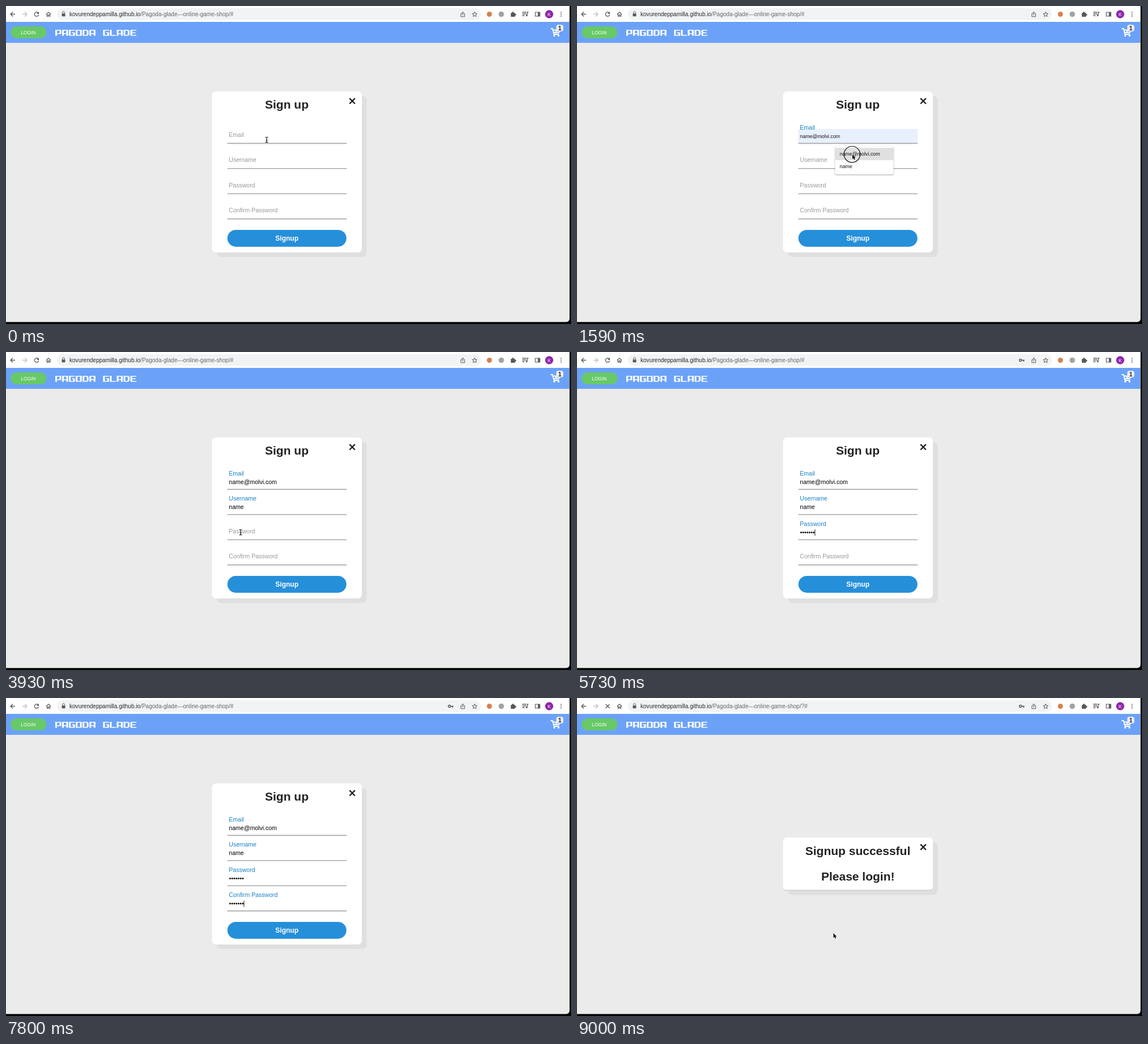
An HTML page with a canvas for the animation above (9.03 s loop, 997 by 561 pixels).

```html
<!DOCTYPE html>
<html lang="en">
<head>
<meta charset="utf-8">
<title>Sign up</title>
<style>
html, body { margin: 0; width: 100%; height: 100%; overflow: hidden; background: #000; }
canvas { display: block; }
</style>
</head>
<body>
<canvas id="stage" width="997" height="561"></canvas>
<script>
const ctx = document.getElementById('stage').getContext('2d');
const LOOP = 9030;
const SANS = '"Liberation Sans", Arial, sans-serif';
const ROW = 44.4;
const EMAIL = 'name@molvi.com';

const fields = [
  { label: 'Email', focus: 690 },
  { label: 'Username', focus: 2340 },
  { label: 'Password', focus: 4020, keys: [4560, 4920, 4980, 5070, 5400, 5460, 5520] },
  { label: 'Confirm Password', focus: 6300, keys: [6720, 6810, 7110, 7200, 7320, 7500, 7620] }
];
const SUBMIT = 8760;

// Pointer path: time, x, y
const pointerPath = [
  [0, 460, 236], [900, 460, 236], [1440, 486, 262], [1740, 486, 262],
  [2160, 446, 275], [2640, 446, 275], [3090, 476, 372], [3420, 476, 372],
  [3720, 414, 318], [5760, 414, 318], [6180, 440, 363], [8040, 440, 363],
  [8310, 450, 454], [8580, 452.5, 415], [LOOP, 452.5, 415]
];
const hiddenSpans = [[2520, 2880], [4560, 5760], [6720, 8040]];
const beamSpans = [[0, 1140], [1980, 2520], [3630, 4560], [5760, 6720], [8040, 8100]];
const clickSpans = [[660, 810], [1530, 1710], [2310, 2460], [3120, 3240],
  [3990, 4140], [6270, 6420], [8610, 8760]];

const within = (spans, t) => spans.some(([a, b]) => t >= a && t < b);
const clamp = v => Math.max(0, Math.min(1, v));
const ease = v => v * v * (3 - 2 * v);
const mix = (a, b, k) => a + (b - a) * k;

function box(x, y, w, h, r, color) {
  ctx.fillStyle = color;
  ctx.beginPath();
  ctx.roundRect(x, y, w, h, r);
  ctx.fill();
}

function disc(x, y, r, color) {
  ctx.fillStyle = color;
  ctx.beginPath();
  ctx.arc(x, y, r, 0, Math.PI * 2);
  ctx.fill();
}

function text(str, x, y, size, color, align = 'left', weight = 400) {
  ctx.font = `${weight} ${size}px ${SANS}`;
  ctx.fillStyle = color;
  ctx.textAlign = align;
  ctx.fillText(str, x, y);
}

function line(d, color, width, x = 0, y = 0, sx = 1, sy = 1) {
  ctx.save();
  ctx.translate(x, y);
  ctx.scale(sx, sy);
  ctx.strokeStyle = color;
  ctx.lineWidth = width;
  ctx.stroke(new Path2D(d));
  ctx.restore();
}

function shape(d, color, x, y) {
  ctx.save();
  ctx.translate(x, y);
  ctx.fillStyle = color;
  ctx.fill(new Path2D(d));
  ctx.restore();
}

function drawToolbar(t) {
  const ink = '#55585c';
  ctx.fillStyle = '#fff';
  ctx.fillRect(0, 0, 994, 28);
  box(90, 4, 748, 20.5, 10, '#f1f3f4');
  line('M4 0H-4M0-4L-4 0L0 4', ink, 1.3, 12, 14.5);
  line('M-4 0H4M0-4L4 0L0 4', '#bfc1c4', 1.3, 33, 14.5);
  if (t >= 8970) {
    line('M-3.5-3.5L3.5 3.5M3.5-3.5L-3.5 3.5', ink, 1.3, 54, 14.5);
  } else {
    line('M2.7-2.6A3.7 3.7 0 1 0 3.6 1', ink, 1.3, 54, 14.5);
    shape('M4-4.5V-.5H0Z', ink, 54, 14.5);
  }
  line('M-4 0L0-3.7L4 0M-2.7-.8V3.6H-.9V1H.9V3.6H2.7V-.8', ink, 1.1, 75, 14.5);

  box(98.5, 13.3, 6, 5, 0.8, ink);
  line('M-1.8 0V-2A1.8 1.8 0 0 1 1.8-2V0', ink, 1, 101.5, 13.5);
  const host = 'kovurendeppamilla.github.io';
  text(host, 112, 17.8, 10.05, '#26282b');
  const hostEnd = 112 + ctx.measureText(host).width;
  text(`/Pagoda-glade---online-game-shop/${t >= 8970 ? '?' : ''}#`, hostEnd, 17.8, 10.05, '#66696d');

  if (t >= 4560) {
    ctx.strokeStyle = ink;
    ctx.lineWidth = 1.5;
    ctx.beginPath();
    ctx.arc(782.5, 14.5, 2, 0, Math.PI * 2);
    ctx.stroke();
    line('M0 0H5M3.8 0V2.5', ink, 1.6, 784.5, 14.5);
  }
  line('M-1.5-1H-3.3V4.3H3.3V-1H1.5M0 2V-4M-2-2.2L0-4.2L2-2.2', ink, 1, 806, 14.5);
  line('M0-4.3L1.2-1.4L4.3-1.2L1.9.8L2.7 3.9L0 2.2L-2.7 3.9L-1.9.8L-4.3-1.2L-1.2-1.4Z', ink, 1, 827, 14.7);
  disc(853, 14.5, 4.5, '#d5814f');
  disc(874, 14.5, 4.8, '#a0a2a4');
  box(890.8, 12, 7.5, 7, 0.8, ink);
  disc(894.5, 11.4, 1.5, ink);
  disc(898.8, 15.3, 1.5, ink);
  line('M-5-3H2M-5 0H2M-5 3H-1M3.7 2.5V-3H6', ink, 1.3, 916, 14);
  disc(918.7, 16.7, 1.5, ink);
  line('M-4-3.5H4V3.5H-4Z', ink, 1.2, 938, 14.5);
  box(938.5, 11, 3.5, 7, 0, ink);
  disc(958.5, 14.5, 7.2, '#8e24aa');
  text('K', 958.5, 17.6, 8.5, '#fff', 'center');
  for (const dy of [-3.2, 0, 3.2]) disc(979.5, 14.5 + dy, 0.95, ink);
}

const letters = {
  P: 'M.5 7V.5H3V4.5H.5',
  A: 'M.5 7V.5H3V7M.5 4.5H3',
  G: 'M3.5 .5H.5V6.5H3V3.5H1.75',
  O: 'M.5 .5H3V6.5H.5Z',
  D: 'M.5 0V6.5H2.4L3 5.5V1.5L2.4 .5H.5',
  L: 'M.5 0V6.5H3.5',
  E: 'M3.5 .5H.5V6.5H3.5M.5 3.5H3'
};

function drawHeader() {
  ctx.fillStyle = '#6ba2f8';
  ctx.fillRect(0, 28, 994, 37);
  box(8, 36, 63.5, 21, 10.5, '#67c967');
  text('LOGIN', 39.3, 49.5, 8.4, '#fff', 'center');
  [...'PAGODA GLADE'].forEach((c, i) => {
    if (letters[c]) line(letters[c], '#fff', 1, 87 + i * 12.05, 42, 3, 1.5);
  });
  line('M-9-6H-5.5L-3 4H6M-4-3.5H7L5.5 1H-3.5', '#fff', 1.8, 970, 46);
  line('M1-3V0M-1-1.5H3', '#fff', 1.2, 970, 46);
  disc(967.5, 52.3, 1.6, '#fff');
  disc(975, 52.3, 1.6, '#fff');
  box(971, 33, 12.5, 12, 4, '#ebebeb');
  text('1', 977.2, 42.5, 10, '#222', 'center', 700);
}

function drawCard(y, h) {
  box(372, y + 8, 264.5, h, 8, '#dfdfdf');
  box(363.5, y, 264.5, h, 7, '#fff');
  line('M-4.8-4.8L4.8 4.8M4.8-4.8L-4.8 4.8', '#222', 2.4, 611, y + 17);
}

function drawField(field, i, t) {
  const dy = i * ROW;
  const k = ease(clamp((t - field.focus) / 210));
  const preview = i === 0 && t >= 1320 && t < 1710;
  if (preview) box(390.5, 217, 210.5, 25, 0, '#e8f0fe');
  const color = `rgb(${mix(153, 24, k)},${mix(153, 128, k)},${mix(153, 196, k)})`;
  text(field.label, 393.3, mix(230.8, 217.8, k) + dy, 10.55, color);
  box(390.5, 241.6 + dy, 210.5, 1.6, 0, '#a9a9a9');

  if (preview) text(EMAIL, 393.3, 233.2, 8.85, '#111');
  else if (i === 0 && t >= 1710) text(EMAIL, 393.3, 233, 10.55, '#000');
  if (i === 1 && t >= 3180) text('name', 393.3, 233 + dy, 10.55, '#000');

  if (field.keys) {
    const count = field.keys.filter(at => t >= at).length;
    for (let n = 0; n < count; n++) disc(395.4 + n * 3.75, 229.6 + dy, 1.45, '#000');
    const focused = t >= field.focus + 60 && (i === 3 || t < fields[3].focus);
    const typing = count > 0 || (t - field.focus) % 1060 < 530;
    if (focused && typing) box(393.4 + count * 3.73, 224.3 + dy, 0.9, 11, 0, '#000');
  }
}

function drawSuggestions(top, items, hovered) {
  const h = items.length * 22.2 + 5;
  ctx.save();
  ctx.shadowColor = 'rgba(0,0,0,.35)';
  ctx.shadowBlur = 2.5;
  ctx.shadowOffsetY = 0.8;
  box(455.5, top, 103, h, 1.5, '#fff');
  ctx.restore();
  shape('M-6 0L0-5L6 0Z', '#fff', 468.5, top + 0.5);
  line('M-6 0L0-5L6 0', '#dedede', 0.7, 468.5, top);
  items.forEach((item, i) => {
    const y = top + 2.5 + i * 22.2;
    if (i === hovered) box(455.5, y, 103, 21.8, 0, '#e0e0e0');
    text(item, 463.5, y + 14, 8.9, '#111');
  });
}

function drawSignup(t) {
  drawCard(150.7, 284);
  text('Sign up', 495.5, 181.3, 21, '#222', 'center', 700);
  fields.forEach((field, i) => drawField(field, i, t));
  box(390.7, 395, 210, 29.7, 14.85, '#268fda');
  text('Signup', 495.7, 414, 12, '#fff', 'center', 700);
  if (t >= 780 && t < 1710) {
    drawSuggestions(247.7, [EMAIL, 'name'], t >= 1320 ? 0 : -1);
  }
  if (t >= 2430 && t < 3180) {
    drawSuggestions(292, ['kovuren', 'Kovuren', 'k', 'name', 's', 'f'], t >= 3060 ? 3 : -1);
  }
}

function drawSuccess() {
  drawCard(246, 93.5);
  box(366, 338.6, 260, 1, 0, '#bcbcbc');
  text('Signup successful', 495.5, 276.7, 21, '#222', 'center', 700);
  text('Please login!', 495.7, 322, 21, '#222', 'center', 700);
}

function pointerAt(t) {
  const next = pointerPath.findIndex(p => p[0] > t);
  const [t0, x0, y0] = pointerPath[next - 1];
  const [t1, x1, y1] = pointerPath[next];
  const k = ease((t - t0) / (t1 - t0));
  return [mix(x0, x1, k), mix(y0, y1, k)];
}

function drawPointer(t) {
  if (within(hiddenSpans, t)) return;
  const [x, y] = pointerAt(t);
  if (within(clickSpans, t)) {
    ctx.strokeStyle = '#111';
    ctx.lineWidth = 1.2;
    ctx.beginPath();
    ctx.arc(x - 0.6, y - 0.3, 14.2, 0, Math.PI * 2);
    ctx.stroke();
  }
  if (within(beamSpans, t)) {
    const beam = 'M-2.5-4.8Q0-4.8 0-3.5V3.5Q0 4.8-2.5 4.8M2.5-4.8Q0-4.8 0-3.5M0 3.5Q0 4.8 2.5 4.8M-1.5 1H1.5';
    line(beam, '#fff', 2.2, x, y);
    line(beam, '#111', 1.1, x, y);
  } else {
    const arrow = 'M0 0V8.2L1.9 6.5L3.2 9.4L4.6 8.8L3.3 6H5.8Z';
    line(arrow, '#fff', 1.2, x, y);
    shape(arrow, '#000', x, y);
  }
}

function draw(t) {
  ctx.fillStyle = '#000';
  ctx.fillRect(0, 0, 997, 561);
  box(0, 0, 994.5, 557.5, [0, 0, 6, 0], '#ebebeb');
  drawToolbar(t);
  drawHeader();
  if (t < SUBMIT) drawSignup(t);
  else drawSuccess();
  drawPointer(t);
}

const start = performance.now();
function tick() {
  draw((performance.now() - start) % LOOP);
  requestAnimationFrame(tick);
}
tick();
</script>
</body>
</html>
```
